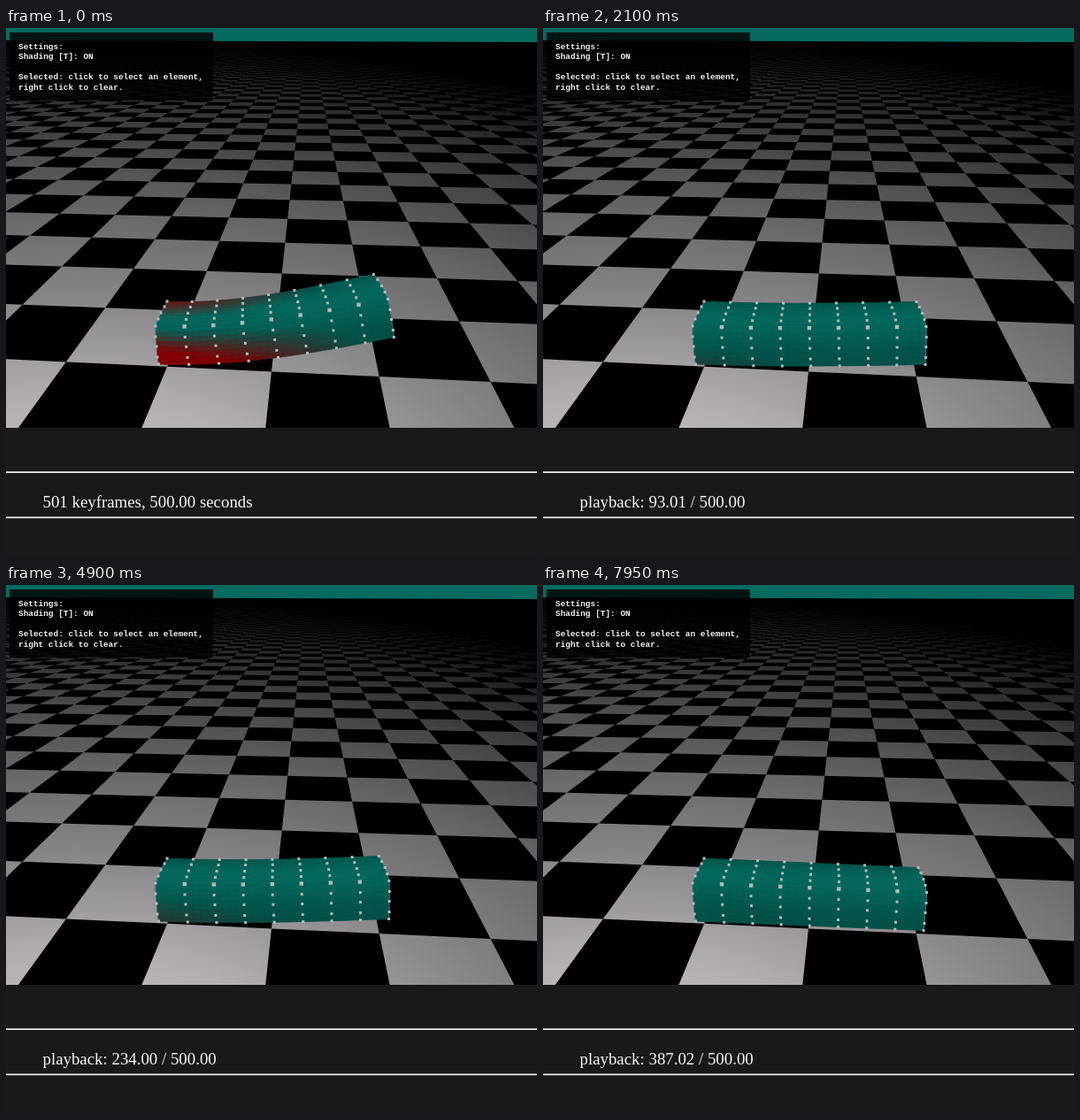
Animation, 600 px wide and 598 px high, one loop 8 s. Source, as an HTML page with a canvas:

```html
<!DOCTYPE html>
<html lang="en">
<head>
<meta charset="utf-8">
<title>Beam playback</title>
<style>
  html, body { margin: 0; width: 100%; height: 100%; overflow: hidden; background: #1a181b; }
  canvas, pre, #status { position: absolute; margin: 0; white-space: pre; }
  canvas { left: 0; top: 0; }
  pre {
    left: 4px; top: 5px; width: 220px; height: 66.3px; padding: 10.7px 0 0 10px;
    background: rgba(0, 0, 0, .8); color: #f2f2f2;
    font: bold 9.42px/11.5px "Liberation Mono", monospace;
  }
  #status {
    left: 41.5px; top: 525.6px; color: #f6f6f6;
    font: 18.85px/20px "Liberation Serif", serif;
  }
</style>
</head>
<body>
<canvas id="stage" width="600" height="598"></canvas>
<pre>Settings:
Shading [T]: ON

Selected: click to select an element,
right click to clear.</pre>
<div id="status"></div>
<script>
const LOOP = 8000, STEP = 50, VIEW_BOTTOM = 452;
const stage = document.getElementById('stage');
const status = document.getElementById('status');
const ctx = stage.getContext('2d');
const clamp = v => Math.max(0, Math.min(1, v));
const lerp = (a, b, f) => a + (b - a) * f;

// Time in ms, lift of the free end in px, playback position in seconds.
const keys = [
  [0, 41, 0], [250, 41, 0], [800, 17, 28.01], [2100, 10, 93.01], [3350, 1, 157],
  [4900, 13, 234], [6050, 6, 292.01], [7950, 0, 387.02]
].map(([t, lift, pos]) => ({ t, lift, pos }));

// Tangents that never overshoot the keyed lifts.
const slope = i => (keys[i + 1].lift - keys[i].lift) / (keys[i + 1].t - keys[i].t);
keys.forEach((key, i) => {
  key.tangent = 0;
  if (i === 0 || i === keys.length - 1) return;
  const a = slope(i - 1), b = slope(i);
  if (a * b > 0) key.tangent = 2 * a * b / (a + b);
});

function stateAt(t) {
  let i = keys.length - 2;
  while (i > 0 && keys[i].t > t) i--;
  const a = keys[i], b = keys[i + 1], span = b.t - a.t;
  const f = clamp((t - a.t) / span), f2 = f * f, f3 = f2 * f;
  const lift = a.lift * (2 * f3 - 3 * f2 + 1) + b.lift * (3 * f2 - 2 * f3)
    + span * (a.tangent * (f3 - 2 * f2 + f) + b.tangent * (f3 - f2));
  const last = f === 1 ? b : a;
  const pos = Math.round(lerp(a.pos, b.pos, f)) + last.pos - Math.round(last.pos);
  return { lift, pos };
}

function tracePoly(c, points) {
  points.forEach(([x, y], i) => i ? c.lineTo(x, y) : c.moveTo(x, y));
  c.closePath();
}

// Projection of the floor grid: j runs right, k runs away from the viewer.
const depth = (j, k) => 5 + k - .08 * j;
const floorPoint = (j, k) => {
  const w = depth(j, k);
  return [(341 * k + 1500 + 575 * j) / w, (1942 - 3 * j) / w];
};

function drawScene() {
  const layer = document.createElement('canvas');
  layer.width = 600;
  layer.height = 598;
  const c = layer.getContext('2d');
  c.fillStyle = '#000';
  c.fillRect(0, 0, 600, VIEW_BOTTOM);

  c.beginPath();
  for (let k = -2; k < 120; k++) {
    for (let j = -80; j < 80; j++) {
      if ((j + k) % 2 || depth(j + 1, k) < 1.5) continue;
      tracePoly(c, [floorPoint(j, k), floorPoint(j + 1, k), floorPoint(j + 1, k + 1), floorPoint(j, k + 1)]);
    }
  }
  const light = c.createRadialGradient(0, 0, 0, 0, 0, 510);
  [[0, 198], [.2, 178], [.4, 140], [.6, 106], [.78, 70], [.9, 40], [.98, 8], [1, 0]].forEach(([at, v]) =>
    light.addColorStop(at, `rgb(${v},${Math.round(v * .98)},${v})`));
  c.setTransform(2.2, 0, 0, 1, 80, 520);
  c.fillStyle = light;
  c.fill();
  c.resetTransform();

  c.fillStyle = '#066a5f';
  c.beginPath();
  tracePoly(c, [[0, 0], [600, 0], [600, 16], [0, 14]]);
  c.fill();

  c.fillStyle = '#1a181b';
  c.fillRect(0, VIEW_BOTTOM, 600, 598 - VIEW_BOTTOM);
  c.fillStyle = '#f0f0f0';
  c.fillRect(0, 501.3, 600, 1.7);
  c.fillRect(0, 552.5, 600, 1.7);
  return layer;
}

// Outline of the beam, top to bottom: left x, right x, y, brightness.
const rows = [
  [182, 424, 309, .82], [179, 427, 315, .9], [175, 430, 322, .98], [172, 432, 329, 1],
  [169, 433.5, 337, .97], [169, 433, 349, .9], [170, 432, 360, .83], [171, 431, 372, .79], [172.5, 430, 380, .76]
];

function rowAt(r) {
  const i = Math.min(Math.floor(r), rows.length - 2);
  return rows[i].map((v, n) => lerp(v, rows[i + 1][n], r - i));
}

function beamPoint(s, r, lift) {
  const [left, right, y] = rowAt(r);
  const turn = lift * 1.5 * (2 * s - s * s) / 258;
  const rise = lift * (3 * s * s - s ** 3) / 2;
  return [lerp(left, right, s) + turn * (y - 345), y + 10.5 * s - rise];
}

function beamColor(s, r, lift) {
  const [, , y, shade] = rowAt(r);
  const strain = lift / 41 * (1 - s) * Math.abs(y - 335) / 40;
  const heat = clamp((strain - .15) / .6);
  const bright = shade + heat * .12;
  const mix = (a, b) => Math.round(lerp(a, b, heat) * bright);
  return `rgb(${mix(4, 142)},${mix(104, 0)},${mix(92, 4)})`;
}

function drawBeam(lift) {
  const cols = 32, sub = 2, last = rows.length - 1;
  ctx.lineWidth = .8;
  for (let n = 0; n < last * sub; n++) {
    for (let m = 0; m < cols; m++) {
      const s = m / cols, s2 = (m + 1) / cols, r = n / sub, r2 = (n + 1) / sub;
      ctx.fillStyle = ctx.strokeStyle = beamColor((s + s2) / 2, (r + r2) / 2, lift);
      ctx.beginPath();
      tracePoly(ctx, [beamPoint(s, r, lift), beamPoint(s2, r, lift), beamPoint(s2, r2, lift), beamPoint(s, r2, lift)]);
      ctx.fill();
      ctx.stroke();
    }
  }

  ctx.strokeStyle = 'rgba(150,160,158,.45)';
  ctx.lineWidth = 1;
  for (const s of [0, 1]) {
    ctx.beginPath();
    for (let r = 0; r <= last; r++) ctx.lineTo(...beamPoint(s, r, lift));
    ctx.stroke();
  }

  ctx.fillStyle = '#b2bab8';
  for (let i = 0; i <= 8; i++) {
    for (let r = 0; r <= last; r++) {
      const [x, y] = beamPoint(i / 8, r, lift);
      const size = r === 4 && i % 8 ? 4.4 : 3;
      ctx.fillRect(x - size / 2, y - size / 2, size, size);
    }
  }
}

const scene = drawScene();
const start = performance.now();

function render(now) {
  const t = Math.floor(Math.max(0, now - start) % LOOP / STEP) * STEP;
  const { lift, pos } = stateAt(t);
  ctx.drawImage(scene, 0, 0);
  drawBeam(lift);
  status.textContent = t < 250
    ? '501 keyframes, 500.00 seconds'
    : `playback: ${pos.toFixed(2)} / 500.00`;
  requestAnimationFrame(render);
}
render(start);
</script>
</body>
</html>
```
